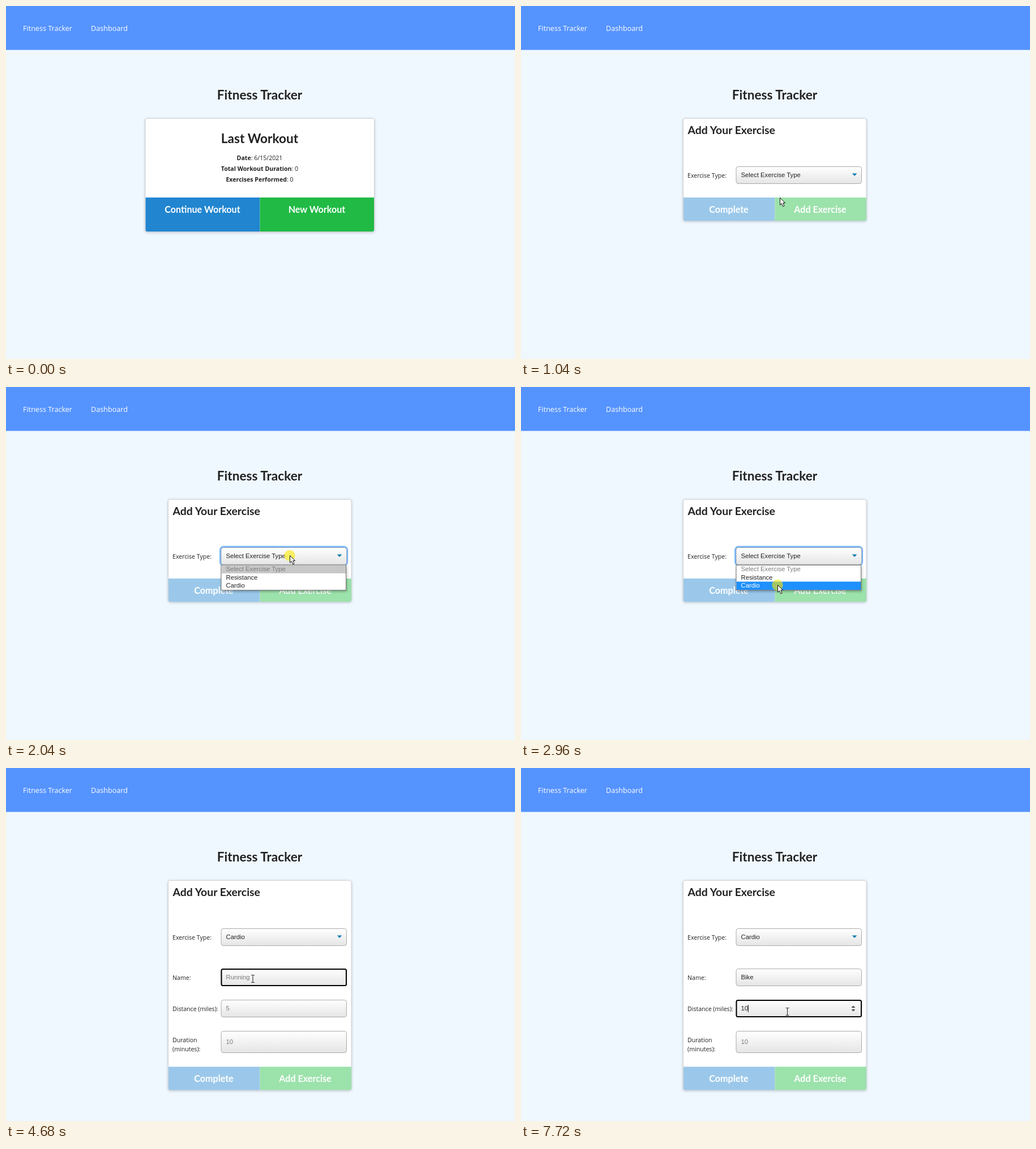
An HTML page for the animation above (8 s loop, 899 by 623 pixels).

```html
<!DOCTYPE html>
<html lang="en">
<head>
<meta charset="utf-8">
<title>Fitness Tracker</title>
<style>
  html, body { margin: 0; width: 100%; height: 100%; overflow: hidden; background: #f0f8ff; }
  svg { display: block; width: 100vw; height: 100vh; }
  text { font: 10.6px "Open Sans", "Noto Sans", sans-serif; fill: #212121; white-space: pre; }
  .bold { font-weight: 700; }
  .nav { font-size: 12.6px; fill: #fff; }
  .h1, .h2, .action { font-family: Lato, sans-serif; font-weight: 700; }
  .h1 { font-size: 22.6px; }
  .h2 { font-size: 19.4px; }
  .action { font-size: 16.1px; fill: #fff; }
  .mid { text-anchor: middle; }
  .field { font: 11.3px "Liberation Sans", Arial, sans-serif; fill: #222; }
  .hint { fill: #7b7b7b; }
  .card { filter: drop-shadow(0 1px 2px rgba(60, 70, 90, .3)); }
  .box { fill: url(#shade); stroke: #aaa; }
  .focus { fill: none; stroke: #000; stroke-width: 2; }
  .menu { filter: drop-shadow(1px 2px 2px rgba(0, 0, 0, .3)); }
</style>
</head>
<body>
<svg viewBox="0 0 899 623" preserveAspectRatio="none">
  <defs>
    <linearGradient id="shade" x2="0" y2="1">
      <stop stop-color="#fff"/><stop offset="1" stop-color="#e5e5e5"/>
    </linearGradient>
  </defs>

  <rect width="899" height="77.5" fill="#5593ff"/>
  <text class="nav" x="30" y="43.5">Fitness Tracker</text>
  <text class="nav" x="150" y="43.5">Dashboard</text>
  <text class="h1 mid" x="448" y="165">Fitness Tracker</text>

  <g id="home">
    <g class="card">
      <rect x="246" y="198.5" width="404.5" height="200" rx="3.5" fill="#fff" stroke="#d4d4d5"/>
      <path d="M246.5 338H448.5V398H249.5a3 3 0 0 1-3-3z" fill="#2185d0"/>
      <path d="M448.5 338H650V395a3 3 0 0 1-3 3H448.5z" fill="#21ba45"/>
    </g>
    <text class="h1 mid" x="448" y="241.5">Last Workout</text>
    <text class="mid" x="448" y="271.5"><tspan class="bold">Date</tspan>: 6/15/2021</text>
    <text class="mid" x="448" y="290.8"><tspan class="bold">Total Workout Duration</tspan>: 0</text>
    <text class="mid" x="448" y="310.2"><tspan class="bold">Exercises Performed</tspan>: 0</text>
    <text class="action mid" x="347" y="365">Continue Workout</text>
    <text class="action mid" x="549" y="365">New Workout</text>
  </g>

  <g id="form">
    <g class="card">
      <rect id="panel" x="286.5" y="198.5" width="323.5" height="180.5" rx="3.5" fill="#fff" stroke="#d4d4d5"/>
    </g>
    <g id="actions">
      <path d="M287 338H448.5V379H290a3 3 0 0 1-3-3z" fill="#9bc8ea"/>
      <path d="M448.5 338H610V376a3 3 0 0 1-3 3H448.5z" fill="#9ce2ab"/>
      <text class="action mid" x="367" y="365">Complete</text>
      <text class="action mid" x="528.5" y="365">Add Exercise</text>
    </g>
    <text class="h2" x="294.5" y="226">Add Your Exercise</text>

    <text x="294" y="303">Exercise Type:</text>
    <rect id="selectRing" x="378.6" y="282.1" width="224" height="32.4" rx="5.5" fill="none" stroke="#76b4fa" stroke-width="3"/>
    <rect class="box" x="380" y="283.5" width="221.5" height="30" rx="4"/>
    <text id="choice" class="field" x="388.5" y="302"></text>
    <path d="M584.8 295.5h8.6l-4.3 4.6z" fill="#007cb2"/>

    <g id="cardio">
      <text x="294" y="374">Name:</text>
      <rect class="box" x="380" y="354.5" width="221.5" height="30" rx="4"/>
      <rect id="nameFocus" class="focus" x="380.5" y="355" width="220.5" height="29" rx="2.5"/>
      <text id="name" x="388.5" y="373"></text>

      <text x="294" y="429">Distance (miles):</text>
      <rect class="box" x="380" y="409.5" width="221.5" height="30" rx="4"/>
      <rect id="distanceFocus" class="focus" x="380.5" y="410" width="220.5" height="29" rx="2.5"/>
      <text id="distance" x="388.5" y="428.3"></text>
      <path id="spinner" d="M583.4 423h7l-3.5-3.6zM583.4 426h7l-3.5 3.6z" fill="#444"/>

      <text x="294" y="484">Duration</text>
      <text x="294" y="499.5">(minutes):</text>
      <rect class="box" x="380" y="464.5" width="221.5" height="38" rx="4"/>
      <text class="field hint" x="388.5" y="487.3">10</text>
      <rect id="caret" width="1" height="13"/>
    </g>

    <g id="menu">
      <rect class="menu" x="380" y="314.3" width="220.5" height="44.2" fill="#fff" stroke="#777"/>
      <rect id="highlight" x="380.5" width="219.5" height="14.4"/>
      <text class="field hint" x="388.5" y="325">Select Exercise Type</text>
      <text id="resistance" class="field" x="388.5" y="339.5">Resistance</text>
      <text id="cardioItem" class="field" x="388.5" y="354">Cardio</text>
    </g>
  </g>

  <g id="mouse">
    <circle id="click" r="9.7" cy=".5" fill="#ffeb00"/>
    <path id="arrow" d="M.5.5V13.2L3.4 10.5 5.6 15.8 8 14.8 5.8 9.6H9.6z" fill="#fff" stroke="#111"/>
    <path id="beam" d="M-3 -6.5h2q1 0 1 1q0-1 1-1h2M0 -6v12.500M-3 6.5h2q1 0 1-1q0 1 1 1h2" fill="none" stroke="#333" stroke-width="1.1"/>
    <path id="hand" d="M-1.500 10V1.500a1.500 1.500 0 0 1 3 0V6l6 1.500q1.500.5 1.500 2V13l-2 4H0L-5 10.500q0-2 2-1z" fill="#fff" stroke="#111"/>
  </g>
</svg>
<script>
const LOOP = 8000;
const OPEN_FORM = 1040, OPEN_MENU = 2040, PICK = 3030, FOCUS_NAME = 4160, FOCUS_DISTANCE = 6590;

// time, x, y of the pointer
const path = [
  [190, 810, 601], [860, 508, 362], [980, 508, 362], [1040, 457, 338], [1570, 501, 308],
  [1840, 501, 308], [1900, 501, 297], [2690, 501, 297], [2900, 453, 349], [3629, 453, 349],
  [3630, 452, 319], [3700, 456, 300], [3800, 461, 311], [3930, 436, 384], [4020, 436, 372],
  [6000, 436, 372], [6200, 481, 422], [6530, 473, 431], [6800, 473, 431], [6860, 470.5, 430]
];
// start and end of each click marker
const clicks = [[860, 1040], [2040, 2360], [2960, 3300], [4160, 4220], [6590, 6730]];
const nameKeys = [5010, 5280, 5470, 5600];
const distanceKeys = [7520, 7720];

const $ = id => document.getElementById(id);
const show = (id, on) => $(id).style.display = on ? '' : 'none';
const within = (v, lo, hi) => v >= lo && v < hi;

function pointerAt(t) {
  const i = path.findIndex(p => p[0] > t);
  if (i < 0) return path.at(-1).slice(1);
  if (i === 0) return path[0].slice(1);
  const [t0, x0, y0] = path[i - 1], [t1, x1, y1] = path[i];
  const u = (t - t0) / (t1 - t0), k = u * u * (3 - 2 * u);
  return [x0 + (x1 - x0) * k, y0 + (y1 - y0) * k];
}

function fillField(id, word, keys, hint, t) {
  const typed = word.slice(0, keys.filter(k => k <= t).length);
  $(id).textContent = typed || hint;
  $(id).setAttribute('class', typed ? 'field' : 'field hint');
  return typed ? $(id).getComputedTextLength() : 0;
}

function drawCaret(t, nameWidth, distanceWidth) {
  const onDistance = t >= FOCUS_DISTANCE;
  const resets = onDistance ? [FOCUS_DISTANCE, ...distanceKeys] : [FOCUS_NAME, ...nameKeys];
  const since = t - resets.filter(k => k <= t).at(-1);
  show('caret', t >= FOCUS_NAME && since % 1040 < 520);
  $('caret').setAttribute('x', 388.2 + (onDistance ? distanceWidth : nameWidth));
  $('caret').setAttribute('y', onDistance ? 418 : 363);
}

function drawMenu(t, y) {
  show('menu', within(t, OPEN_MENU, PICK));
  const row = y >= 343 ? 2 : y >= 328.5 ? 1 : 0;
  $('highlight').setAttribute('y', 314.5 + row * 14.5);
  $('highlight').setAttribute('fill', row ? '#1e90ff' : '#c8c8c8');
  $('resistance').style.fill = row === 1 ? '#fff' : '';
  $('cardioItem').style.fill = row === 2 ? '#fff' : '';
}

function drawPointer(t, x, y, overDistance) {
  const overName = t >= PICK && within(y, 354, 385);
  const isBeam = t >= 3700 && (overName || overDistance);
  const isHand = t < OPEN_FORM && within(x, 448, 650) && within(y, 338, 398);
  show('mouse', t >= path[0][0]);
  show('beam', isBeam);
  show('hand', isHand);
  show('arrow', !isBeam && !isHand);
  $('mouse').setAttribute('transform', `translate(${x} ${y})`);
  const click = clicks.find(([a, b]) => within(t, a, b));
  $('click').setAttribute('opacity', click ? .6 * (1 - (t - click[0]) / (click[1] - click[0])) : 0);
}

function draw(t) {
  const [x, y] = pointerAt(t);
  const expanded = t >= PICK;
  const overDistance = expanded && within(y, 409, 440);

  show('home', t < OPEN_FORM);
  show('form', t >= OPEN_FORM);
  show('cardio', expanded);
  $('panel').setAttribute('height', expanded ? 370 : 180.5);
  $('actions').setAttribute('transform', `translate(0 ${expanded ? 189.3 : 0})`);
  $('choice').textContent = expanded ? 'Cardio' : 'Select Exercise Type';

  show('selectRing', within(t, OPEN_MENU, FOCUS_NAME));
  show('nameFocus', within(t, FOCUS_NAME, FOCUS_DISTANCE));
  show('distanceFocus', t >= FOCUS_DISTANCE);
  show('spinner', overDistance);

  const nameWidth = fillField('name', 'Bike', nameKeys, 'Running', t);
  const distanceWidth = fillField('distance', '10', distanceKeys, '5', t);
  drawCaret(t, nameWidth, distanceWidth);
  drawMenu(t, y);
  drawPointer(t, x, y, overDistance);
}

const start = performance.now();
function tick() {
  draw((performance.now() - start) % LOOP);
  requestAnimationFrame(tick);
}
tick();
</script>
</body>
</html>
```
